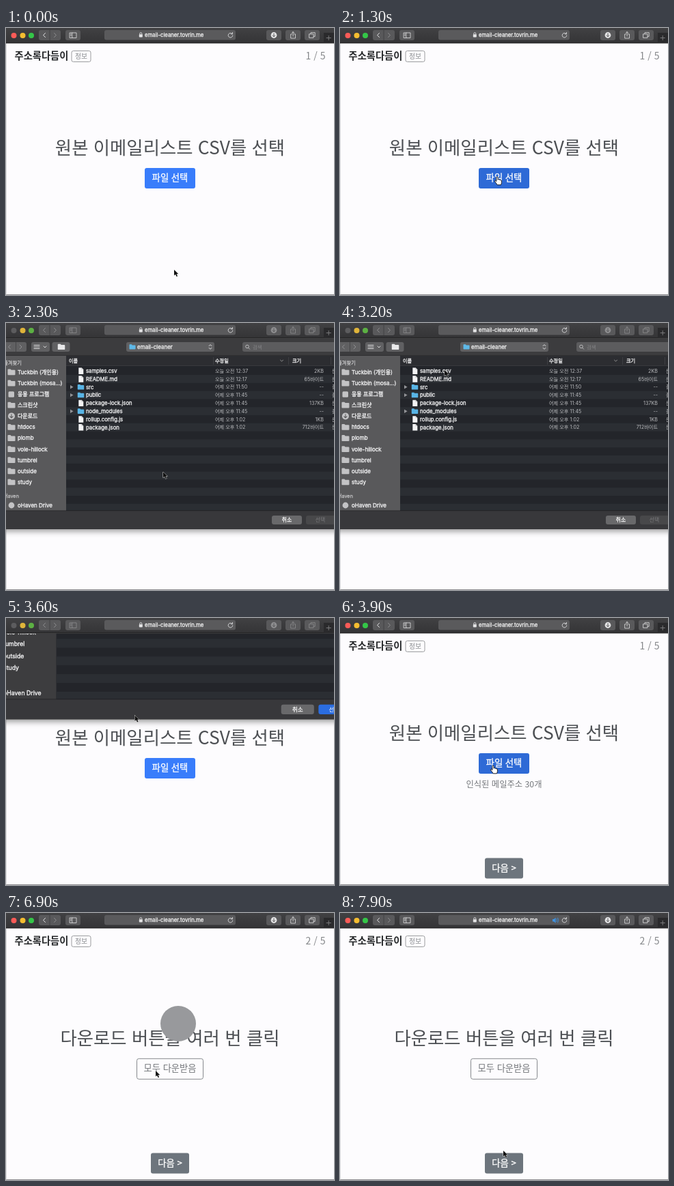
An HTML page for the animation above (8000 ms loop, 480 by 391 pixels).

```html
<!DOCTYPE html>
<html lang="ko">
<head>
<meta charset="utf-8">
<title>주소록다듬이</title>
<style>
html, body { margin: 0; width: 100%; height: 100%; overflow: hidden; background: #fdfcfe; }
svg { display: block; width: 480px; height: 391px; }
text { font-family: "Noto Sans CJK KR", "Noto Sans CJK", sans-serif; white-space: pre; }
.ui text { font-family: Inter, "Noto Sans CJK KR", "Noto Sans CJK", sans-serif; }
.firm { stroke: currentColor; stroke-width: .3px; }
</style>
</head>
<body>
<svg id="stage" viewBox="0 0 480 391" xmlns="http://www.w3.org/2000/svg"></svg>
<script>
const LOOP = 8000, STEP = 100;
const DIM = [1700, 3700], LOADED = 3800, PAGE2 = 5100, DONE = 6500;

// [time, x, y] of the pointer tip
const POINTER = [
  [0, 246, 354], [300, 246, 354], [900, 230, 218], [2400, 230, 218],
  [3100, 153, 69], [3400, 153, 69], [3800, 224, 216], [4000, 224, 216],
  [4500, 239, 361], [5500, 239, 361], [6100, 219, 231], [7300, 219, 231],
  [7800, 239, 348], [8000, 239, 348]
];
// [time, distance of the sheet above its resting place]
const SHEET = [[1900, 1.8], [2000, 1], [2100, .35], [2200, .07], [2300, 0],
               [3400, 0], [3500, .5], [3600, 1.5], [3700, 2.6]];
// [time, x, y, radius] of the flying download
const FLIGHT = [[6700, 228, 216, 20], [6800, 238, 188, 25], [6900, 252, 162, 26],
                [7000, 298, 104, 21], [7100, 353, 44, 13], [7200, 389, 12, 7]];

const ease = u => u * u * (3 - 2 * u);
function track(steps, t, curve = u => u) {
  const i = Math.max(0, steps.findLastIndex(s => s[0] <= t));
  const a = steps[i], b = steps[i + 1] || a;
  const u = b === a ? 0 : curve((t - a[0]) / (b[0] - a[0]));
  return a.slice(1).map((v, n) => v + (b[n + 1] - v) * u);
}
const within = (t, a, b) => t >= a && t < b;

const rect = (x, y, w, h, fill, r = 0, more = '') =>
  `<rect x="${x}" y="${y}" width="${w}" height="${h}" rx="${r}" fill="${fill}" ${more}/>`;
const circle = (x, y, r, fill, more = '') =>
  `<circle cx="${x}" cy="${y}" r="${r}" fill="${fill}" ${more}/>`;
const line = (d, color, w = 1) =>
  `<path d="${d}" fill="none" stroke="${color}" stroke-width="${w}" stroke-linecap="round" stroke-linejoin="round"/>`;
const shape = (d, fill) => `<path d="${d}" fill="${fill}"/>`;
// y is the visual middle of the line; weight 500 is drawn slightly thickened
const text = (x, y, size, fill, str, anchor = 'start', weight = 400) =>
  `<text x="${x}" y="${y + size * .36}" font-size="${size}" fill="${fill}" color="${fill}" text-anchor="${anchor}" ` +
  (weight === 500 ? 'class="firm"' : `font-weight="${weight}"`) + `>${str}</text>`;
const mid = (y, size, fill, str) => text(240, y, size, fill, str, 'middle');

function toolbar(t) {
  const dim = within(t, ...DIM);
  const ink = dim ? '#8e8e90' : '#e4e4e5';
  const box = '#59595b';
  let s = rect(0, 0, 480, 22, 'url(#bar)') + rect(0, 21.5, 480, 1, '#161617');
  s += circle(11.5, 11, 4, dim ? '#5c5c5e' : '#fc5b57');
  s += circle(24.5, 11, 4, dim ? '#dfb43a' : '#f5bd30') + circle(37, 11, 4, dim ? '#5cb043' : '#34c648');
  for (const [x, w] of [[48, 32], [87, 22], [381, 22], [409, 22], [437, 22]]) s += rect(x, 3, w, 15, box, 3);
  s += rect(63.7, 3, .7, 15, '#39393b');
  s += line('M57.5 7.5 54.5 10.5 57.5 13.5', ink) + line('M70.5 7.5 73.5 10.5 70.5 13.5', '#8e8e90');
  s += line('M93.5 7h9.5v7.5h-9.5zM96.8 7v7.5M94.6 9h1M94.6 11h1', ink, .8);
  s += rect(144, 3, 192, 14.5, '#5a5a5c', 3);
  s += rect(194.8, 9.3, 5, 4.2, '#e4e4e5', .7) + line('M195.8 9.5v-1.3a1.5 1.5 0 0 1 3 0v1.3', '#e4e4e5', .9);
  s += text(203, 10.5, 7.75, '#f0f0f0', 'email-cleaner.tovrin.me', 'start', 500);
  s += line('M331 8.5A3.3 3.3 0 1 0 331.8 11M331.5 6.5v2.3h-2.3', '#dcdcdd', .9);
  s += circle(392, 10.5, 4.4, ink) + line('M392 8v4.5M390.2 11 392 12.8 393.8 11', box, 1);
  s += line('M418.3 9h-1.6v6h6.8V9h-1.7M420.1 12V5.7M418.4 7.3 420.1 5.6 421.8 7.3', ink, .8);
  s += line('M444 8.8h6v5.6h-6zM446 8.5V6.7h6.2v5.6h-2', ink, .8);
  s += rect(465, 7, 15, 15, '#2a2a2c') + line('M469 14.5h6.4M472.2 11.3v6.4', '#8b8b8d', .8);
  if (t >= 7200) s += shape('M311 9h2l2.6-2.3v8L313 12.4h-2z', '#3f91df') +
    line('M317 8.5q1.3 2.1 0 4.2M318.7 7.2q2.2 3.4 0 6.8', '#3f91df', .9);
  return `<g class="ui">${s}</g>`;
}

const button = (b, over) =>
  rect(b.x, b.y, b.w, 30, over ? b.hot : b.fill, 3, b.line ? `stroke="${b.line}"` : '') +
  text(b.x + b.w / 2, b.y + 14.3, 13.3, b.ink || '#fff', b.label, 'middle', b.line ? 400 : 500);

function buttons(t) {
  const list = [];
  if (t < PAGE2) list.push({ x: 203, y: t < LOADED ? 205 : 198, w: 74, fill: '#397dfb', hot: '#2e6ad6', label: '파일 선택' });
  else if (t < DONE) list.push({ x: 174.5, y: 213, w: 131, fill: '#3ba1b8', hot: '#348595', label: '1번째 파일 다운받기' });
  else list.push({ x: 191.5, y: 213.3, w: 97, fill: '#fdfcfe', hot: '#fdfcfe', line: '#85898d', ink: '#74777b', label: '모두 다운받음', idle: true });
  if (within(t, LOADED, PAGE2) || t >= DONE)
    list.push({ x: 212, y: 351.5, w: 56, fill: '#6d757d', hot: '#5b6369', label: '다음 &gt;' });
  return list;
}

function page(t, hit) {
  const second = t >= PAGE2;
  let s = rect(0, 0, 480, 391, '#fdfcfe') + rect(0, 390, 480, 1, '#8d8d90') + rect(0, 22, .6, 369, '#c8c8cb');
  s += text(12.5, 40.5, 14.3, '#26282a', '주소록다듬이', 'start', 700);
  s += rect(96, 33.5, 28, 16, 'none', 2.5, 'stroke="#909295" stroke-width=".9"') + text(110, 41, 9.8, '#85888b', '정보', 'middle');
  s += text(467.5, 40.5, 14, '#85878a', (second ? 2 : 1) + ' / 5', 'end');
  if (second) s += mid(183.5, t < DONE ? 26 : 26.4, '#4c4f53', '다운로드 버튼을 여러 번 클릭');
  else s += mid(t < LOADED ? 175.5 : 168.5, 26.4, '#4c4f53', '원본 이메일리스트 CSV를 선택');
  if (within(t, LOADED, PAGE2)) s += mid(244, 12.3, '#74777b', '인식된 메일주소 30개');
  for (const b of buttons(t)) s += button(b, b.label === hit?.label);
  return s;
}

const FILES = [
  ['samples.csv', '오늘 오전 12:37', '2KB'], ['README.md', '오늘 오전 12:17', '65바이트'],
  ['src', '어제 오전 11:50', '--', 1], ['public', '어제 오후 11:45', '--', 1],
  ['package-lock.json', '어제 오후 11:45', '137KB'], ['node_modules', '어제 오후 11:45', '--', 1],
  ['rollup.config.js', '어제 오후 1:02', '1KB'], ['package.json', '어제 오후 1:02', '712바이트']
];
const PLACES = ['Tuckbin (개인용)', 'Tuckbin (mosa...)', '응용 프로그램', '스크린샷', '다운로드',
                'htdocs', 'plomb', 'vole-hillock', 'tumbrel', 'outside', 'study'];
const folder = (x, y, fill, k = 1) =>
  `<path transform="translate(${x} ${y}) scale(${k})" d="M-5-3.2q0-.9.9-.9h2.7l1.2 1.2h4.3q.9 0 .9.9v5q0 .9-.9.9h-8.2q-.9 0-.9-.9z" fill="${fill}"/>`;

function sheetTools() {
  let s = rect(-40, 22, 560, 26, '#3c3c3e') + rect(-40, 47.5, 560, .7, '#222');
  for (const [x, w] of [[-2, 32], [37, 27], [67.5, 26], [176, 129]]) s += rect(x, 28, w, 14, '#606062', 3);
  s += rect(14, 28, .7, 14, '#3c3c3e');
  s += line('M6.5 32 3.5 35 6.5 38M20 32 23 35 20 38', '#929294');
  s += line('M41 32.5h8M41 35h8M41 37.5h8M55 34l2 2 2-2', '#e8e8e9', .9);
  s += folder(81, 35, '#e8e8e9', 1.05);
  s += folder(185, 35, '#5eb9e8', .9) + text(192, 35, 8, '#f0f0f0', 'email-cleaner', 'start', 500);
  s += line('M297 33.7l2-2 2 2M297 36.3l2 2 2-2', '#e8e8e9', .9);
  s += rect(346, 28, 160, 14, '#5c5c5e', 3) + circle(353, 34.5, 2.3, 'none', 'stroke="#c4c4c6" stroke-width=".9"');
  return s + line('M354.8 36.4l1.8 1.8', '#c4c4c6', .9) + text(361, 35, 7.4, '#858587', '검색');
}

function sidebar(shade) {
  const back = `rgb(${shade},${shade},${shade + 2})`, icon = '#c3c3c5', ink = '#f6f6f7';
  let s = rect(-40, 48, 128, 227, back) + text(-4, 58, 7.3, '#bdbdbf', '즐겨찾기', 'start', 500);
  PLACES.forEach((name, i) => {
    const y = 72 + i * 16.1;
    if (i === 2) s += rect(3.5, y - 4, 8.5, 8.5, icon, 1.5);
    else if (i === 4) s += circle(8, y, 5, icon) + line(`M8 ${y - 2.6}v4.8M5.9 ${y + .4} 8 ${y + 2.5} 10.1 ${y + .4}`, back, 1.1);
    else s += folder(8, y, icon, 1.1);
    s += text(17, y, 8, ink, name, 'start', 500);
  });
  s += text(-3, 253, 7.3, '#bdbdbf', 'Haven', 'start', 500);
  return s + circle(8, 267, 4.4, icon) + text(17, 267, 8, ink, 'oHaven Drive', 'start', 500);
}

function fileTable(picked) {
  let s = rect(88, 48, 430, 227, '#23252a') + rect(88, 48, 430, 14.5, '#2c2d31') + rect(88, 62, 430, .6, '#444548');
  for (let i = 1; i < 18; i += 2) s += rect(88, 64.2 + i * 11.8, 430, Math.min(11.8, 210.3 - i * 11.8), '#2b2e33');
  for (const [x, name] of [[92, '이름'], [306, '수정일'], [419, '크기']]) s += text(x, 55, 7.2, '#e4e4e5', name, 'start', 500);
  s += line('M401.5 54.2l2 2 2-2', '#aaa', .8);
  for (const x of [303, 413, 475]) s += rect(x, 50, .6, 11, '#4b4c50');
  if (picked) s += rect(88, 64.2, 430, 11.8, '#1458cc');
  FILES.forEach(([name, date, size, dir], i) => {
    const y = 70.2 + i * 11.8, ink = picked && !i ? '#fff' : '#b9babd';
    if (dir) s += shape(`M94 ${y - 2.7}l4.6 2.7-4.6 2.7z`, '#939498') + folder(109.5, y, '#58b4e5', .95);
    else s += shape(`M106.3 ${y - 4.7}h4.4l2.6 2.6v6.8h-7z`, '#f4f4f5') + line(`M110.7 ${y - 4.5}v2.4h2.4`, '#a8a8aa', .5);
    s += text(117, y, 7.75, '#f4f4f5', name, 'start', 500) + text(306, y, 7.2, ink, date) + text(465, y, 7.2, ink, size, 'end');
    s += text(477, y, 7.2, ink, dir ? '폴더' : '문서');
  });
  return s;
}

function sheet(t) {
  if (!within(t, SHEET[0][0], DIM[1])) return '';
  const [k] = track(SHEET, t);
  const picked = t >= 3300;
  let s = rect(-40, 22, 560, 280, '#39393b', 0, 'filter="url(#shadow)"');
  s += sheetTools() + sidebar(Math.round(89 - 28 * Math.min(1, k))) + fileTable(picked);
  s += rect(-40, 274.5, 560, .7, '#202022');
  s += rect(389, 282, 44, 13, '#69696b', 3) + text(411, 288.3, 7.8, '#f2f2f2', '취소', 'middle', 500);
  s += rect(439, 282, 44, 13, picked ? '#2b6de0' : '#48484a', 3) + text(460, 288.3, 7.8, picked ? '#fff' : '#7b7b7d', '선택', 'middle');
  return `<g clip-path="url(#below)"><g class="ui" transform="translate(${-15 * k} ${-121 * k}) scale(${1 + .062 * k})">${s}</g></g>`;
}

const ARROW = 'M0 0v8.6l2-1.8 1.5 3.3 1.6-.7-1.5-3.2h2.7z';
const HAND = 'M-1.1 1Q-1.1-.1 0-.1T1.1 1v3.2l.3-.5q1.4-.5 1.7.6 1.5-.5 1.8.6 1.5-.3 1.5 1v2.5Q6.4 10 5.4 11.8H.2Q-1.4 9-3.3 7q-.8-1.5.7-1.6l1.5 1.2z';
const pointer = (x, y, hand) => hand
  ? `<path transform="translate(${x} ${y})" d="${HAND}" fill="#fff" stroke="#111" stroke-width=".9"/>`
  : `<path transform="translate(${x} ${y})" d="${ARROW}" fill="#111" stroke="#fff" stroke-width=".8" paint-order="stroke"/>`;

const DEFS = `<defs>
  <linearGradient id="bar" x2="0" y2="1"><stop stop-color="#414143"/><stop offset="1" stop-color="#343436"/></linearGradient>
  <clipPath id="below"><rect y="22.5" width="480" height="369"/></clipPath>
  <filter id="shadow" x="-10%" y="-10%" width="120%" height="125%"><feDropShadow dx="0" dy="3" stdDeviation="4" flood-opacity=".4"/></filter>
</defs>`;

function picture(t) {
  const [x, y] = track(POINTER, t, ease);
  const free = !within(t, 2200, DIM[1]);
  const hit = free && buttons(t).find(b => !b.idle && x > b.x && x < b.x + b.w && y > b.y && y < b.y + 30);
  const stale = within(t, PAGE2, 5600);
  let s = DEFS + page(t, hit) + sheet(t) + toolbar(t);
  if (within(t, 6700, 7300)) {
    const [cx, cy, r] = track(FLIGHT, t);
    s += circle(cx, cy, r, '#98999c');
  }
  return s + pointer(x, y, hit || stale);
}

const stage = document.getElementById('stage');
const start = performance.now();
let shown = -1;
function tick() {
  const t = Math.floor((performance.now() - start) % LOOP / STEP) * STEP;
  if (t !== shown) stage.innerHTML = picture(shown = t);
  requestAnimationFrame(tick);
}
tick();
</script>
</body>
</html>
```
